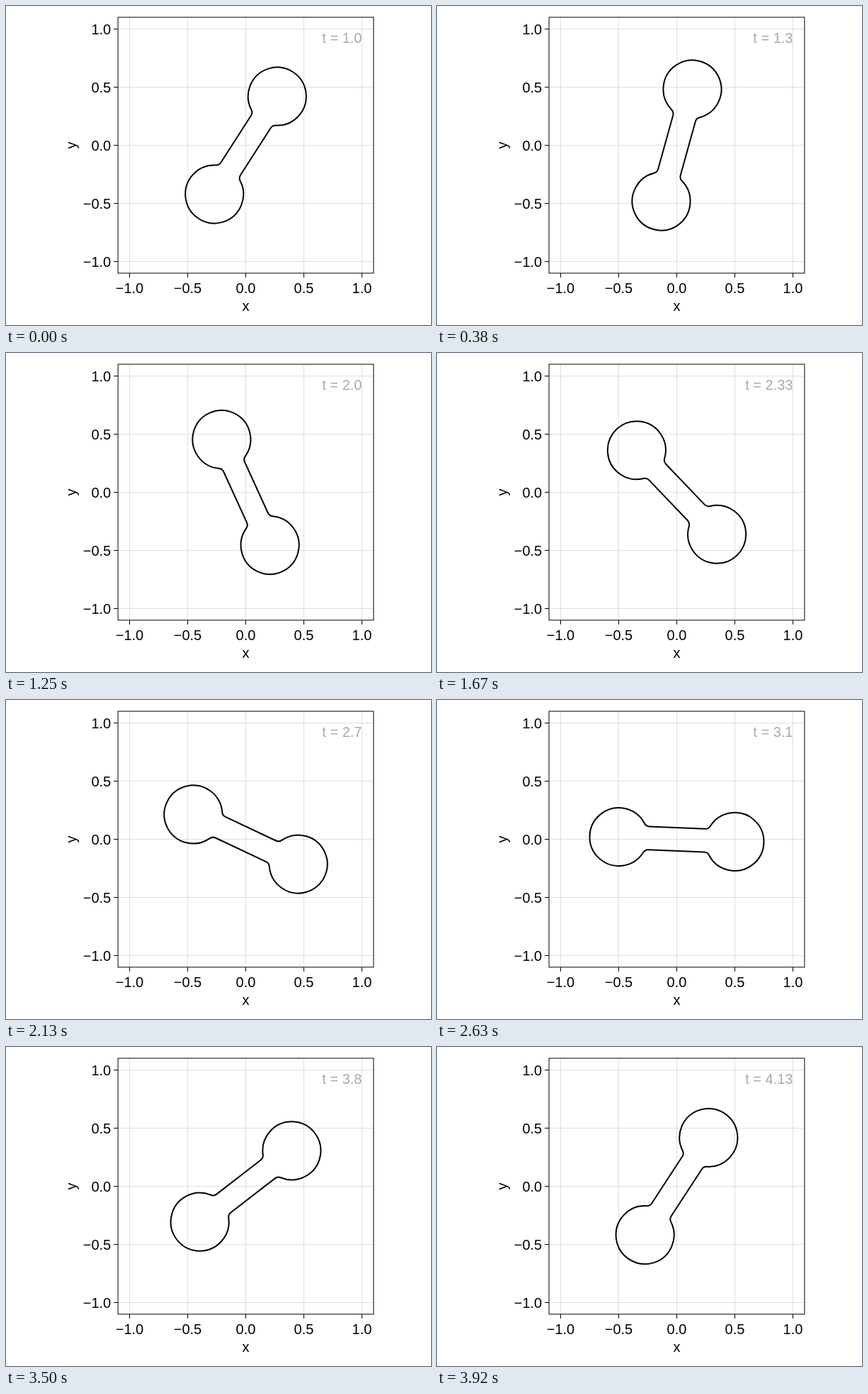
Recreate the animation shown at these times as an HTML page. Size 600 px wide and 450 px high, loop 3.96 s.

```html
<!DOCTYPE html>
<html lang="en">
<head>
<meta charset="utf-8">
<title>Rotating dumbbell</title>
<style>
  html, body { margin: 0; width: 100%; height: 100%; overflow: hidden; background: #fff; }
  svg { display: block; }
  text { font: 20px "Liberation Sans", Arial, sans-serif; }
  .mid { text-anchor: middle; }
  .end { text-anchor: end; }
  .grid { stroke: #000; stroke-opacity: .12; }
  .axis { stroke: #000; fill: none; }
</style>
</head>
<body>
<svg id="stage" width="600" height="450" viewBox="0 0 600 450">
  <g id="plot"></g>
  <rect class="axis" x="158.1" y="15.9" width="360.8" height="361"/>
  <text class="mid" x="338.4" y="430">x</text>
  <text class="mid" transform="translate(99 196.5) rotate(-90)">y</text>
  <path id="shape" fill="none" stroke="#000" stroke-width="2" stroke-linejoin="round"/>
  <text id="clock" class="end" x="502.5" y="51.5" fill="#a9a9a9"></text>
</svg>
<script>
const UNIT = 164, CX = 338.5, CY = 196.5;
const LEFT = 158, RIGHT = 519, TOP = 16, BOTTOM = 377, TICK = 6;
const LOOP = 3960, FPS = 24;
const plot = document.getElementById('plot');
const shape = document.getElementById('shape');
const clock = document.getElementById('clock');

function add(tag, attrs, text = '') {
  const el = document.createElementNS('http://www.w3.org/2000/svg', tag);
  for (const key in attrs) el.setAttribute(key, attrs[key]);
  el.textContent = text;
  plot.append(el);
}

function line(cls, x1, y1, x2, y2) {
  add('line', { class: cls, x1, y1, x2, y2 });
}

for (let v = -1; v <= 1; v += 0.5) {
  const x = CX + v * UNIT, y = CY - v * UNIT;
  const label = v.toFixed(1).replace('-', '\u2212');
  line('grid', x, TOP, x, BOTTOM);
  line('grid', LEFT, y, RIGHT, y);
  line('axis', x, BOTTOM, x, BOTTOM + TICK);
  line('axis', LEFT - TICK, y, LEFT, y);
  add('text', { class: 'mid', x, y: 404.5 }, label);
  add('text', { class: 'end', x: 148.2, y: y + 7.2 }, label);
}

// Two discs joined by a bar, with rounded inner corners.
function dumbbell(reach, radius, half, fillet) {
  const span = Math.sqrt((radius + fillet) ** 2 - (half + fillet) ** 2);
  const k = radius / (radius + fillet);
  const barX = reach - span, discX = reach - k * span, discY = k * (half + fillet);
  const pt = (x, y) => `${x * UNIT} ${y * UNIT}`;
  const arc = (r, flags, x, y) => `A${r * UNIT} ${r * UNIT} 0 ${flags} ${pt(x, y)}`;
  const side = s => `L${pt(s * barX, -s * half)}`
    + arc(fillet, '0 0', s * discX, -s * discY)
    + arc(radius, '1 1', s * discX, s * discY)
    + arc(fillet, '0 0', s * barX, s * half);
  return `M${pt(-barX, -half)}${side(1)}${side(-1)}Z`;
}

shape.setAttribute('d', dumbbell(0.5, 0.25, 0.1, 0.05));

function draw(now) {
  // Steps at 24 per second, rounded to hundredths of a second.
  const cs = Math.floor((now % LOOP) / 10);
  const step = Math.ceil((cs + 0.5) * FPS / 100) - 1;
  const t = 1 + step / 30;
  const shown = Math.round(t * 100) / 100;
  shape.setAttribute('transform', `translate(${CX} ${CY}) rotate(${-t * 180 / Math.PI})`);
  clock.textContent = 't = ' + (Number.isInteger(shown) ? shown.toFixed(1) : shown);
}

function tick() {
  draw(performance.now());
  requestAnimationFrame(tick);
}
tick();
</script>
</body>
</html>
```
